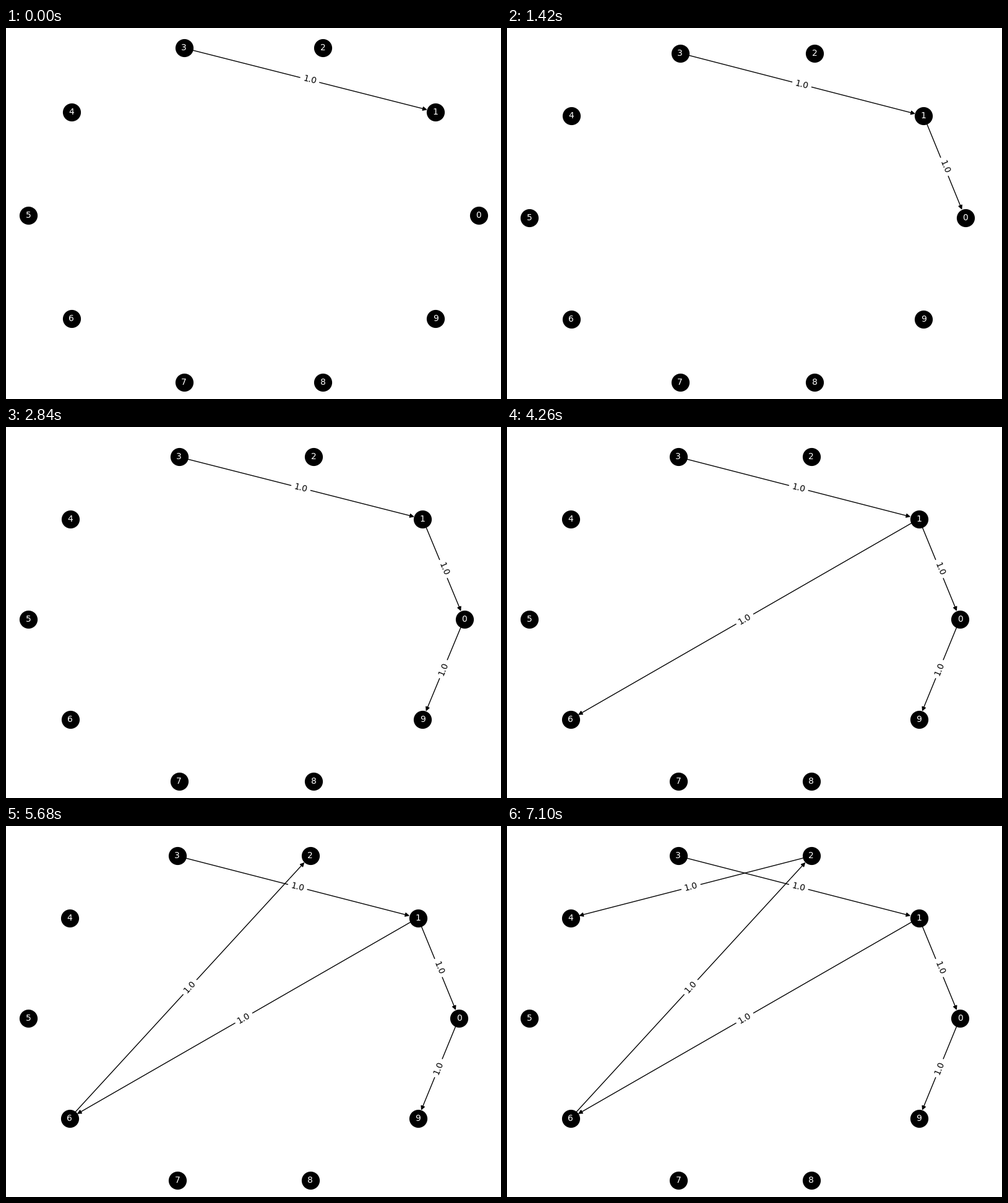
Animation of 800 by 600 pixels, one loop 8 s. Source, as a matplotlib script:

```python
import numpy as np
import matplotlib.pyplot as plt
from matplotlib.animation import FuncAnimation
from matplotlib.patches import FancyArrowPatch

plt.rcParams["font.family"] = "DejaVu Sans"

W, H, DPI = 800, 600, 100
LOOP, TICK, STEP = 8000, 20, 1420
NODE_SIZE = 400
EDGES = [(3, 1), (1, 0), (0, 9), (1, 6), (6, 2), (2, 4)]

angles = 2 * np.pi * np.arange(10) / 10
pos = np.column_stack([np.cos(angles), np.sin(angles)])

fig = plt.figure(figsize=(W / DPI, H / DPI), dpi=DPI, facecolor="white")


def view_limits(edges):
    """Range of all nodes and of the padded edges, plus a 5% margin."""
    ends = pos[np.unique(edges)]
    pad = 0.05 * np.ptp(ends, axis=0)
    low = np.minimum(pos.min(axis=0), ends.min(axis=0) - pad)
    high = np.maximum(pos.max(axis=0), ends.max(axis=0) + pad)
    margin = 0.05 * (high - low)
    return low - margin, high + margin


def upright_angle(ax, a, b):
    dx, dy = np.diff(ax.transData.transform([a, b]), axis=0)[0]
    angle = np.degrees(np.arctan2(dy, dx))
    return (angle + 90) % 180 - 90


def draw_graph(edges):
    ax = fig.add_axes([0, 0, 1, 1])
    ax.axis("off")
    low, high = view_limits(edges)
    ax.set_xlim(low[0], high[0])
    ax.set_ylim(low[1], high[1])

    shrink = np.sqrt(NODE_SIZE) / 2
    for i, j in edges:
        ax.add_patch(FancyArrowPatch(
            pos[i], pos[j], arrowstyle="-|>", mutation_scale=10,
            shrinkA=shrink, shrinkB=shrink, color="black", linewidth=1,
            zorder=1))
    for i, j in edges:
        ax.text(*(pos[i] + pos[j]) / 2, "1.0", size=10, color="black",
                ha="center", va="center", zorder=1,
                rotation=upright_angle(ax, pos[i], pos[j]),
                bbox=dict(boxstyle="round", ec="white", fc="white"))

    ax.scatter(*pos.T, s=NODE_SIZE, c="black", linewidths=1,
               edgecolors="black", zorder=2)
    for n, (x, y) in enumerate(pos):
        ax.text(x, y, str(n), size=10, color="white",
                ha="center", va="center", zorder=3)
    return ax


stages = [draw_graph(EDGES[:k + 1]) for k in range(len(EDGES))]


def update(frame):
    current = frame * TICK // STEP
    for k, ax in enumerate(stages):
        ax.set_visible(k == current)
    return stages


anim = FuncAnimation(fig, update, frames=LOOP // TICK, interval=TICK,
                     init_func=lambda: update(0), repeat=True,
                     repeat_delay=0, blit=False)
plt.show()
```
